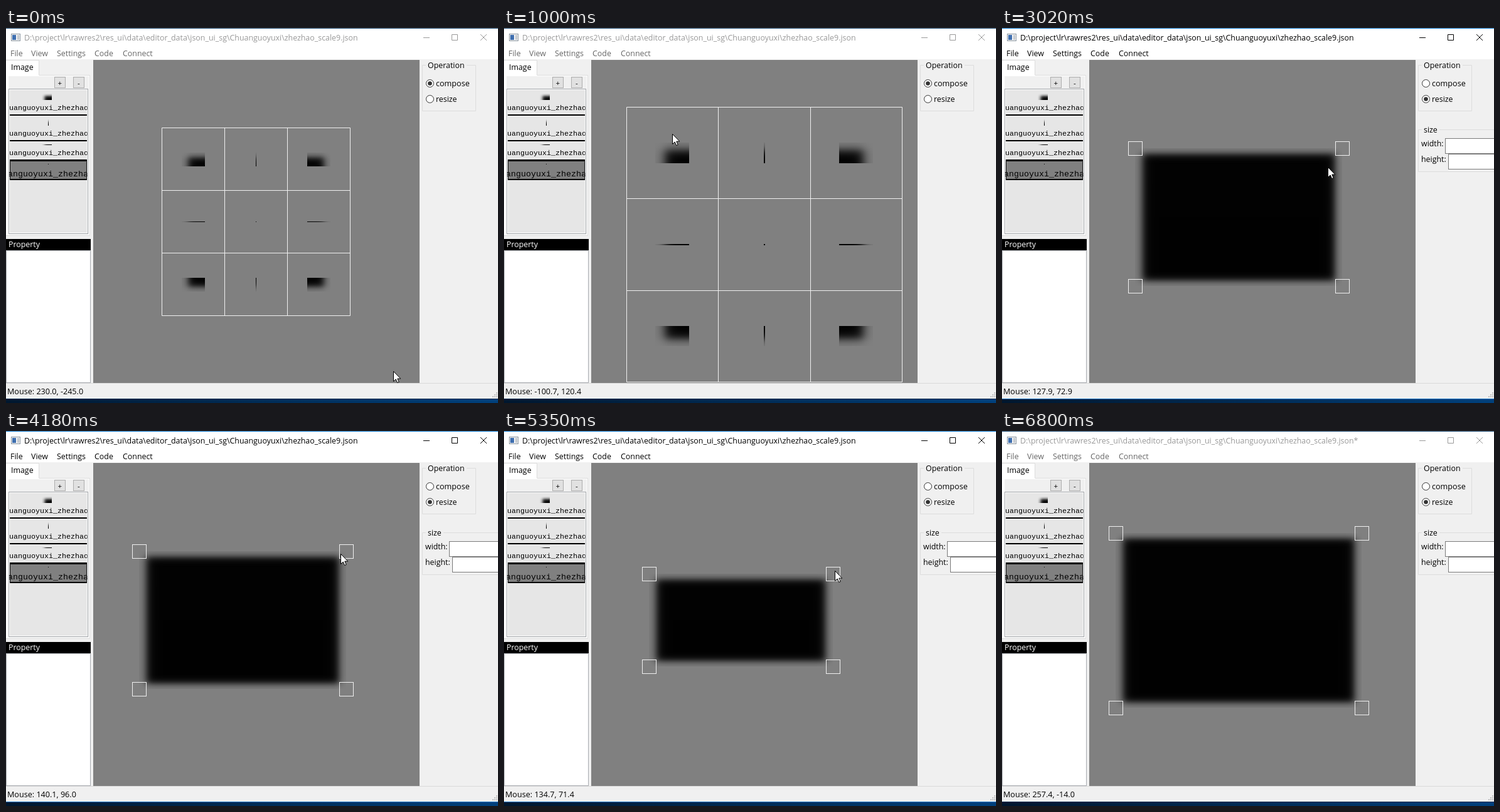
An HTML page with a canvas that plays this animation: 784x599 px, repeating every 6870 ms.

```html
<!DOCTYPE html>
<html lang="en">
<head>
<meta charset="utf-8">
<title>Nine-patch editor</title>
<style>
  html, body { margin: 0; width: 100%; height: 100%; overflow: hidden; background: #f0f0f0; }
  svg, canvas { position: absolute; left: 0; top: 0; width: 784px; height: 599px; }
  svg { --title: #999; --menu: #666; --edge: #1c4a72; --foot: #00254a; }
  svg.active { --title: #000; --menu: #000; --edge: #0a78d0; --foot: #0b6fc0; }
  text { font: 12.4px "Open Sans", "Noto Sans", sans-serif; fill: #000; white-space: pre; }
  .title { fill: var(--title); }
  .menu { fill: var(--menu); }
  .mono { font: 11.67px "Liberation Mono", "DejaVu Sans Mono", monospace; }
  .big { font-size: 13.33px; }
  .ctl { fill: none; stroke: var(--title); }
  .box { fill: none; stroke: #dcdcdc; }
  .btn { fill: #e1e1e1; stroke: #adadad; }
  .field { fill: #fff; stroke: #7a7a7a; }
  .radio { fill: #fff; stroke: #333; }
  .radio.hover { stroke: #0078d7; }
  .hidden { display: none; }
</style>
</head>
<body>
<svg id="ui" viewBox="0 0 784 599">
  <defs>
    <linearGradient id="desk">
      <stop offset="0" stop-color="#00172f"/><stop offset="1" stop-color="#00407c"/>
    </linearGradient>
    <clipPath id="listClip"><rect x="5" y="98" width="124.5" height="230"/></clipPath>
  </defs>
  <rect width="784" height="599" fill="#f0f0f0"/>
  <rect width="784" height="50" fill="#fff"/>
  <rect width="784" height="1" style="fill:var(--edge)"/>

  <rect x="8.5" y="9.5" width="14" height="11" fill="#f4f4f4" stroke="#8b96a0"/>
  <rect x="10" y="11" width="6" height="8" fill="#3f6fb0"/>
  <rect x="18" y="11" width="3" height="8" fill="#c4c9ce"/>
  <text id="title" class="title" x="29" y="20"></text>
  <path class="ctl" d="M665 15.5h10M710.5 10.5h9v9h-9zM756 10l10 10M766 10l-10 10"/>
  <text class="menu" x="7" y="45">File</text>
  <text class="menu" x="40" y="45">View</text>
  <text class="menu" x="81" y="45">Settings</text>
  <text class="menu" x="141" y="45">Code</text>
  <text class="menu" x="186" y="45">Connect</text>

  <rect x="0" y="75" width="133" height="257" fill="#fff"/>
  <path class="box" d="M52.5 75.5H133.5V331.5H0"/>
  <rect x="4" y="77" width="128" height="253" fill="#f0f0f0"/>
  <rect x="0" y="52" width="52" height="25" fill="#fff"/>
  <path class="box" d="M0 51.5H52.5V75"/>
  <text x="8" y="67">Image</text>
  <rect class="btn" x="77.5" y="78.5" width="17" height="17"/>
  <rect class="btn" x="107.5" y="78.5" width="17" height="17"/>
  <text x="82.5" y="92" style="font-size:11.5px">+</text>
  <text x="114" y="92" style="font-size:11.5px">-</text>

  <rect x="4.5" y="97.5" width="126" height="231" fill="#e6e6e6" stroke="#a3a6aa"/>
  <rect x="5.5" y="98.5" width="124" height="229" fill="none" stroke="#fff"/>
  <rect x="6" y="138" width="123" height="2"/>
  <rect x="6" y="179" width="123" height="2"/>
  <rect x="6" y="210" width="123" height="33"/>
  <rect x="7" y="213" width="121" height="28" fill="#808080"/>
  <g clip-path="url(#listClip)">
    <text class="mono" x="5" y="131">uanguoyuxi_zhezhao</text>
    <text class="mono" x="5" y="172">uanguoyuxi_zhezhao</text>
    <text class="mono" x="5" y="203">uanguoyuxi_zhezhao</text>
    <text class="mono big" x="3" y="237">anguoyuxi_zhezhao</text>
  </g>

  <rect x="0" y="337" width="135" height="18"/>
  <text x="4" y="350" style="fill:#fff">Property</text>
  <rect x=".5" y="355.5" width="134" height="211" fill="#fff" stroke="#a8abb0"/>

  <path class="box" d="M669 59.5H663.5V132.5H748.5V59.5H734"/>
  <text x="672" y="64">Operation</text>
  <circle class="radio" cx="675.5" cy="88.5" r="6"/>
  <circle id="radio" class="radio" cx="675.5" cy="113.5" r="6"/>
  <circle id="dot" cx="675.5" cy="88.5" r="3.3" fill="#333"/>
  <text x="685" y="93" style="font-size:12.6px">compose</text>
  <text x="685" y="118">resize</text>
  <g id="size">
    <path class="box" d="M669 162.5H663.5V229.5H790M697 162.5H790"/>
    <text x="672" y="167">size</text>
    <text x="668" y="189">width:</text>
    <text x="668" y="214">height:</text>
    <rect class="field" x="706.5" y="176.5" width="90" height="24"/>
    <rect class="field" x="711.5" y="201.5" width="90" height="24"/>
  </g>

  <rect y="567" width="784" height="1" fill="#d9d9d9"/>
  <text id="status" x="2" y="585" style="font-size:12.6px"></text>
  <path fill="#bfbfbf" d="M781 582h2v2h-2zM778 585h2v2h-2zM781 585h2v2h-2zM775 588h2v2h-2zM778 588h2v2h-2zM781 588h2v2h-2z"/>
  <rect y="592" width="784" height="7" fill="url(#desk)"/>
  <rect y="592" width="784" height="1" style="fill:var(--foot)"/>
</svg>
<canvas id="stage" width="784" height="599"></canvas>
<script>
const LOOP = 6870, STEP = 77.2, LAST = 88;
const ACTIVATE = 28, RESIZE = 30, EDITED = 77;
const W = 37, H = 22; // corner patch size
const PATH = 'D:\\project\\lr\\rawres2\\res_ui\\data\\editor_data\\json_ui_sg\\Chuanguoyuxi\\zhezhao_scale9.json';
const FIRST_READING = '230.0, -245.0';

// wheel notches: one per step, each scaling by 1.1 about the pointer
const wheel = [
  { from: 6, count: 4, factor: 1.1, x: 363.4, y: 230.9 },
  { from: 15, count: 3, factor: 1 / 1.1, x: 264.8, y: 171.1 }
];
// pointer stops: step, x, y
const stops = [
  [0, 616, 548], [6, 363, 231], [13, 267.4, 169.7], [17, 265, 171],
  [26, 659.6, 133], [28, 680.5, 120.5], [31, 680.5, 120.5],
  [37, 540, 205], [48, 420, 300], [54, 531.6, 196.9], [57, 541, 194],
  [62, 484.6, 253], [65, 484.6, 253], [73, 566.7, 194.9],
  [75, 573, 164], [76, 573, 164], [78, 660.6, 317.9], [80, 845, 640]
];
// panel drags: step, half width, half height
const drags = [[57, 165, 110], [62, 110, 52.5], [65, 110, 52.5], [73, 183, 95.5], [75, 196, 139.5]];

const $ = id => document.getElementById(id);
const ctx = $('stage').getContext('2d');

function tween(keys, n) {
  const k = keys.findIndex(r => r[0] > n);
  if (k < 0) return keys[keys.length - 1].slice(1);
  if (k === 0) return keys[0].slice(1);
  const a = keys[k - 1], b = keys[k], p = (n - a[0]) / (b[0] - a[0]);
  return a.slice(1).map((v, i) => v + (b[i + 1] - v) * p);
}

const pointer = n => tween(stops, n);

// scale and centre of the artwork
function view(n) {
  let s = 1, cx = 398.5, cy = 309.5;
  for (const { from, count, factor, x, y } of wheel) {
    const f = factor ** Math.max(0, Math.min(count, n - from + 1));
    s *= f;
    cx = x + (cx - x) * f;
    cy = y + (cy - y) * f;
  }
  return [s, cx, cy];
}

function makePatch() {
  const c = document.createElement('canvas');
  c.width = W; c.height = H;
  const g = c.getContext('2d');
  const soft = (d, mid, w) => 1 / (1 + Math.exp((mid - d) / w));
  for (let y = 0; y < H; y++) for (let x = 0; x < W; x++) {
    g.fillStyle = `rgba(0,0,0,${soft(x + .5, 10.5, 3.4) * soft(y + .5, 7.8, 2.9)})`;
    g.fillRect(x, y, 1, 1);
  }
  return c;
}
const patch = makePatch();

// i, j in -1..1 choose corner, edge or middle and its mirroring
function piece(i, j, x0, y0, x1, y1) {
  const l = Math.round(x0), t = Math.round(y0);
  const w = Math.max(1, Math.round(x1) - l), h = Math.max(1, Math.round(y1) - t);
  ctx.save();
  ctx.translate(i > 0 ? l + w : l, j > 0 ? t + h : t);
  ctx.scale(i > 0 ? -1 : 1, j > 0 ? -1 : 1);
  ctx.drawImage(patch, i ? 0 : W - 1, j ? 0 : H - 1, i ? W : 1, j ? H : 1, 0, 0, w, h);
  ctx.restore();
}

function centred(i, j, x, y, s) {
  const w = (i ? W : 1) * s / 2, h = (j ? H : 1) * s / 2;
  piece(i, j, x - w, y - h, x + w, y + h);
}

function eachCell(fn) {
  for (const j of [-1, 0, 1]) for (const i of [-1, 0, 1]) fn(i, j);
}

const crisp = v => Math.floor(v + .1) + .5;

function drawGrid([s, cx, cy]) {
  eachCell((i, j) => centred(i, j, cx + i * 100 * s, cy + j * 100 * s, s));
  ctx.beginPath();
  for (const k of [-150, -50, 50, 150]) {
    const x = crisp(cx + k * s), y = crisp(cy + k * s);
    ctx.moveTo(x, crisp(cy - 150 * s)); ctx.lineTo(x, crisp(cy + 150 * s));
    ctx.moveTo(crisp(cx - 150 * s), y); ctx.lineTo(crisp(cx + 150 * s), y);
  }
  ctx.stroke();
}

function drawPanel([s, cx, cy], [hw, hh]) {
  const cuts = (c, half, edge) => [c - half, c - half + edge, c + half - edge, c + half];
  const xs = cuts(cx, hw, W * s), ys = cuts(cy, hh, H * s);
  eachCell((i, j) => piece(i, j, xs[i + 1], ys[j + 1], xs[i + 2], ys[j + 2]));
  for (const x of [cx - hw, cx + hw]) for (const y of [cy - hh, cy + hh])
    ctx.strokeRect(crisp(x - 11), crisp(y - 11), 22, 22);
}

const arrow = new Path2D('M.5 .5V16.5L4.2 13L6.7 18.6L9.2 17.5L6.8 12.1H11.8Z');

function drawCursor([x, y]) {
  ctx.save();
  ctx.translate(Math.round(x + 1), Math.round(y - .5));
  ctx.fillStyle = '#fff';
  ctx.strokeStyle = '#000';
  ctx.fill(arrow);
  ctx.stroke(arrow);
  ctx.restore();
}

function drawThumbs() {
  piece(-1, -1, 57, 105, 73, 115);
  piece(0, -1, 67, 146, 68, 156);
  piece(-1, 0, 57, 186, 73, 187);
  piece(0, 0, 67, 217, 68, 218);
}

// keeps the last position inside the canvas
function readout(n) {
  if (n === 0) return FIRST_READING;
  while (pointer(n)[0] > 661) n--;
  const [x, y] = pointer(n), [s, cx, cy] = view(n);
  return `${((x - cx) / s).toFixed(1)}, ${((cy - y) / s).toFixed(1)}`;
}

function render(n) {
  const resizing = n >= RESIZE, [x, y] = pointer(n);
  $('ui').classList.toggle('active', n >= ACTIVATE && n < LAST);
  $('title').textContent = PATH + (n >= EDITED ? '*' : '');
  $('status').textContent = 'Mouse: ' + readout(n);
  $('radio').classList.toggle('hover', x > 668 && x < 722 && y > 104 && y < 123);
  $('dot').setAttribute('cy', resizing ? 113.5 : 88.5);
  $('size').classList.toggle('hidden', !resizing);

  ctx.clearRect(0, 0, 784, 599);
  ctx.fillStyle = '#808080';
  ctx.fillRect(139, 51, 520, 516);
  ctx.strokeStyle = '#f0f0f0';
  ctx.lineWidth = 1;
  if (resizing) drawPanel(view(n), tween(drags, n));
  else drawGrid(view(n));
  drawThumbs();
  drawCursor([x, y]);
}

const start = performance.now();
let shown = -1;
function tick() {
  const t = (performance.now() - start) % LOOP;
  const n = Math.min(LAST, Math.floor((t + 8) / STEP));
  if (n !== shown) render(shown = n);
  requestAnimationFrame(tick);
}
tick();
</script>
</body>
</html>
```
